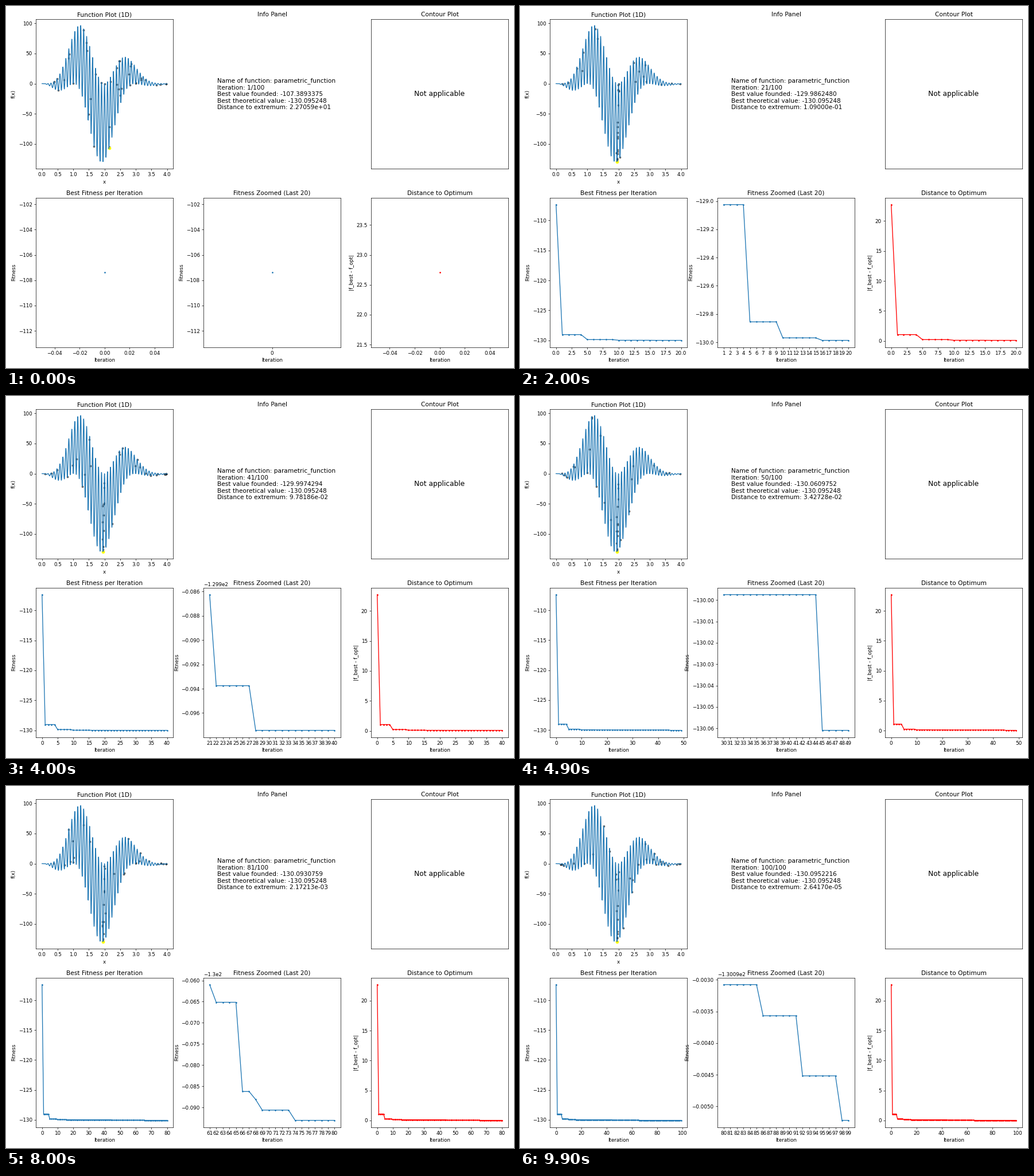
A matplotlib script for the animation above (10000 ms loop, 885x632 px).

```python
import numpy as np
import matplotlib.pyplot as plt
from matplotlib.animation import FuncAnimation

W, H, DPI = 885, 632, 63.2
N_ITER, WINDOW = 100, 20
OPTIMUM = -130.095248

# (iteration, distance to the optimum), held until the next key point
KEY_POINTS = [
    (0, 22.7059105), (1, 1.07), (5, 0.24), (10, 0.1266828),
    (16, 0.109), (22, 0.1015), (28, 0.0978186), (45, 0.0342728),
    (62, 0.0301), (66, 0.009), (68, 0.00709263), (69, 0.0046),
    (74, 0.00217213), (86, 0.00168), (92, 0.00073), (98, 2.6417e-5),
]

steps = np.arange(N_ITER)
starts, levels = map(np.array, zip(*KEY_POINTS))
distance = levels[np.searchsorted(starts, steps, side="right") - 1]
fitness = OPTIMUM + distance


def objective(x):
    envelope = 50.1 * x**2.217 * np.exp(-0.2143 * x**2.6)
    return envelope * (np.cos(66 * x) - np.sin(3.2 * (x - 1.5)))


def population(i):
    """Candidates at iteration i: spread out first, then gathering at the minimum."""
    rng = np.random.default_rng(100 + i)
    n = 40
    share = 0.35 * (1 - np.exp(-i / 6))
    near = rng.normal(1.962, 0.022, n)
    wide = np.clip(rng.uniform(0.08, 4.2, n), 0, 3.97)
    return np.where(rng.random(n) < share, near, wide)


plt.rcParams.update({"font.family": "DejaVu Sans", "font.size": 10})

# the tiny surplus keeps the canvas from being truncated one pixel short
fig = plt.figure(figsize=((W + 0.001) / DPI, (H + 0.001) / DPI), dpi=DPI,
                 facecolor="white")


def panel(col, row, title, xlabel="", ylabel=""):
    left = 51.9 + 291.95 * col
    bottom = H - 284 - 311.6 * row
    ax = fig.add_axes([left / W, bottom / H, 239.5 / W, 260.7 / H])
    ax.set_title(title, y=1.0)
    ax.set_xlabel(xlabel)
    ax.set_ylabel(ylabel)
    return ax


def trace(ax, color):
    return ax.plot([], [], color=color, marker="o", markersize=2)[0]


def update_trace(line, x, y):
    line.set_data(x, y)
    line.axes.relim()
    line.axes.autoscale_view()


func_ax = panel(0, 0, "Function Plot (1D)", "x", "f(x)")
info_ax = panel(1, 0, "Info Panel")
contour_ax = panel(2, 0, "Contour Plot")
best_ax = panel(0, 1, "Best Fitness per Iteration", "Iteration", "Fitness")
zoom_ax = panel(1, 1, "Fitness Zoomed (Last 20)", "Iteration", "Fitness")
dist_ax = panel(2, 1, "Distance to Optimum", "Iteration", "|f_best - f_opt|")

xs = np.linspace(0, 4, 1000)
func_ax.plot(xs, objective(xs), color="C0")
func_ax.set(xlim=(-0.2, 4.2), ylim=(-141.3, 106.8))
dots = func_ax.scatter([], [], s=11, color="black", alpha=0.5)
best_dot = func_ax.scatter([], [], s=30, color="yellow")

info_ax.axis("off")
info = info_ax.text(0.1, 0.5, "", fontsize=12, va="center",
                    transform=info_ax.transAxes)

contour_ax.set(xticks=[], yticks=[])
contour_ax.text(0.5, 0.5, "Not applicable", fontsize=14, ha="center",
                va="center", transform=contour_ax.transAxes)

best_line = trace(best_ax, "C0")
zoom_line = trace(zoom_ax, "C0")
dist_line = trace(dist_ax, "red")


def update(i):
    x = population(i)
    dots.set_offsets(np.column_stack([x, objective(x)]))
    best_dot.set_offsets([[2.154 if i == 0 else 1.9516, fitness[i]]])

    info.set_text(
        "Name of function: parametric_function\n"
        f"Iteration: {i + 1}/{N_ITER}\n"
        f"Best value founded: {fitness[i]:.7f}\n"
        f"Best theoretical value: {OPTIMUM:.6f}\n"
        f"Distance to extremum: {distance[i]:.5e}"
    )

    seen = slice(0, i + 1)
    last = slice(max(0, i + 1 - WINDOW), i + 1)
    update_trace(best_line, steps[seen], fitness[seen])
    update_trace(zoom_line, steps[last], fitness[last])
    zoom_ax.set_xticks(steps[last])
    update_trace(dist_line, steps[seen], distance[seen])
    return dots, best_dot, info, best_line, zoom_line, dist_line


anim = FuncAnimation(fig, update, frames=N_ITER, interval=100, repeat=True)
plt.show()
```
